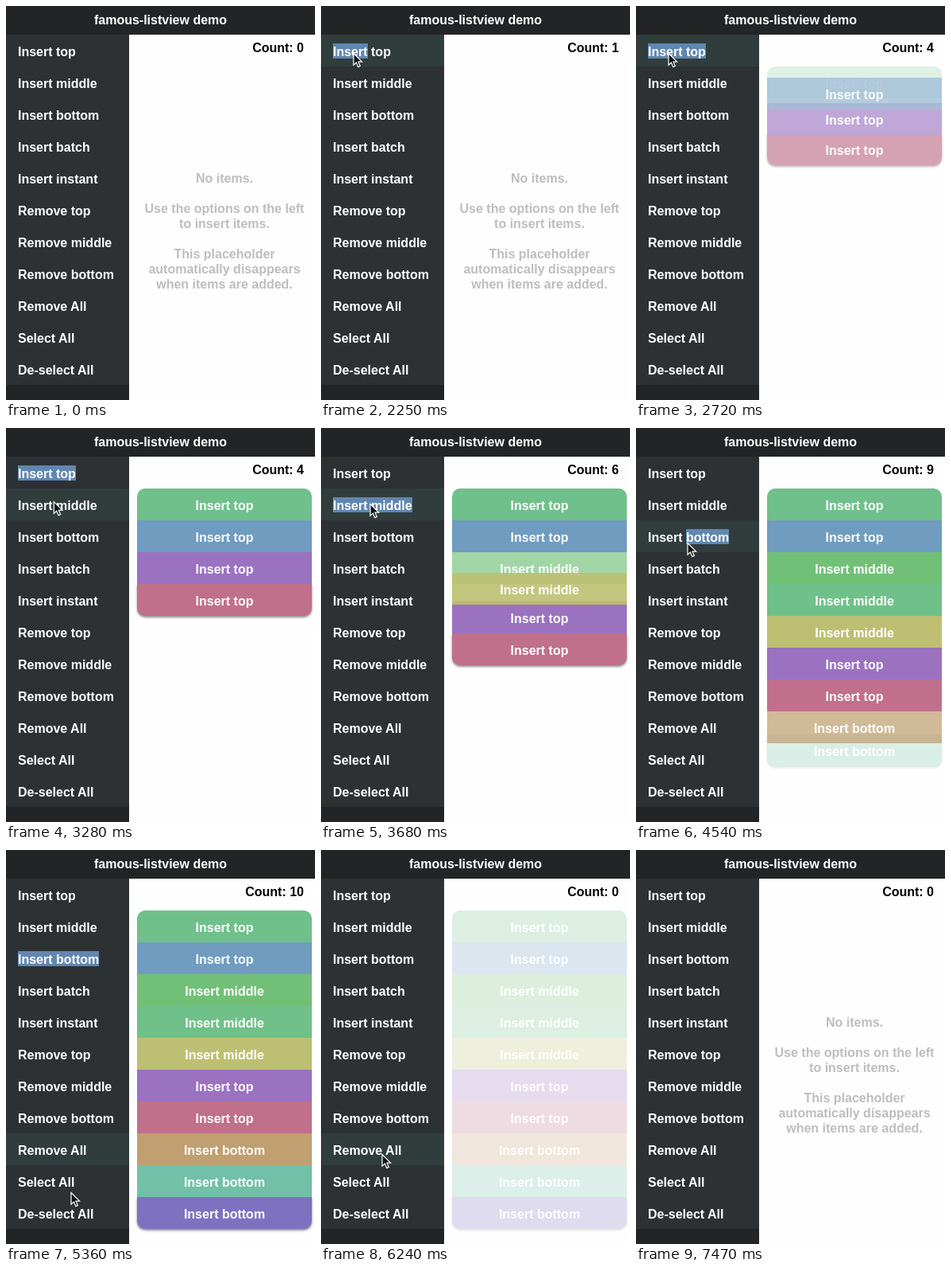
Recreate the animation shown at these times as an HTML page. Size 389 by 495 pixels, loop 8030 ms.

```html
<!DOCTYPE html>
<html lang="en">
<head>
<meta charset="utf-8">
<title>famous-listview demo</title>
<style>
  html, body { margin: 0; width: 100%; height: 100%; overflow: hidden; }
  body { position: relative; background: #fefefe; font: bold 16px/19px "Liberation Sans", Arial, sans-serif; }
  body > * { position: absolute; }
  header { left: 0; top: 0; width: 389px; height: 36px; line-height: 36px; text-align: center; background: #232426; color: #fff; }
  nav { left: 0; top: 36px; width: 155px; height: 459px; background: #232426; color: #fff; }
  nav div { height: 40px; line-height: 44px; padding-left: 15px; background: #2d3134; white-space: pre; }
  nav .hover { background: #303d3c; }
  mark { background: #6186b0; color: inherit; padding-top: 2px; }
  #count { right: 14px; top: 43px; color: #000; }
  #empty { left: 155px; top: 207px; width: 240px; text-align: center; white-space: pre; color: #bebebe; }
  #list { left: 165px; top: 76px; width: 220px; }
  #list div { position: absolute; width: 220px; height: 40px; line-height: 44px; text-align: center; color: #fff; }
  #list .first { border-top-left-radius: 10px; border-top-right-radius: 10px; }
  #list .last { border-bottom-left-radius: 10px; border-bottom-right-radius: 10px; box-shadow: 0 2px 3px rgba(0, 0, 0, .45); }
  #cursor { left: 0; top: 0; overflow: visible; z-index: 20; }
</style>
</head>
<body>
<header>famous-listview demo</header>
<nav></nav>
<div id="count"></div>
<div id="empty">No items.

Use the options on the left
to insert items.

This placeholder
automatically disappears
when items are added.</div>
<div id="list"></div>
<svg id="cursor" width="11" height="18">
  <path d="M0 .5V15.2L3.4 12.1 5.8 17.6 8.3 16.5 6 11.2H10.6Z" fill="#111" stroke="#fff" stroke-width="1.2"/>
</svg>
<script>
const LOOP = 8030, ROW = 40, CLEAR = 6060, ENTER = 720, LEAVE = 7470, HOVER_LAG = 100;
const $ = s => document.querySelector(s);
const clamp = v => Math.max(0, Math.min(1, v));
const ramp = (t, from, to) => clamp((t - from) / (to - from));

const labels = ['Insert top', 'Insert middle', 'Insert bottom', 'Insert batch', 'Insert instant',
  'Remove top', 'Remove middle', 'Remove bottom', 'Remove All', 'Select All', 'De-select All'];

// Items in list order: time added, menu label, colour
const items = [
  [2633, 0, '#70c08b'], [2506, 0, '#709cc0'], [3520, 1, '#72c078'], [3700, 1, '#70c08a'],
  [3397, 1, '#bdc072'], [2378, 0, '#9b72c0'], [2248, 0, '#c0708b'],
  [4359, 2, '#c0a070'], [4471, 2, '#72c0a8'], [4600, 2, '#7e72c0']
].map(([added, label, color]) => ({ added, label, color }));

// Selected text: from, to, row, first and last character
const selections = [
  [2248, 2380, 0, 0, 6], [2380, 3390, 0, 0, 10],
  [3480, 3600, 1, 7, 13], [3600, 4350, 1, 0, 13],
  [4460, 4590, 2, 7, 13], [4590, CLEAR, 2, 0, 13]
];

// Pointer path: time, x, y
const path = [
  [ENTER, 0, 50], [1000, 41, 59], [3060, 41, 59], [3300, 62, 95], [3920, 62, 95],
  [4250, 65, 144], [4900, 65, 144], [5360, 82, 430], [5440, 82, 430], [5530, 80, 422],
  [5700, 77, 382], [7310, 77, 382], [7415, 146, 470]
];

function add(parent, text) {
  const el = document.createElement('div');
  el.textContent = text;
  parent.append(el);
  return el;
}
const rows = labels.map(text => add($('nav'), text));
for (const item of items) {
  item.el = add($('#list'), labels[item.label]);
  item.el.style.background = item.color;
}

// Critically damped spring from 0 to 1
function spring(age) {
  const a = Math.max(0, age) * .0138;
  return 1 - (1 + a) * Math.exp(-a);
}

function pointer(t) {
  let i = 1;
  while (i < path.length - 1 && t > path[i][0]) i++;
  const [t0, x0, y0] = path[i - 1], [t1, x1, y1] = path[i];
  const k = ramp(t, t0, t1);
  return [x0 + (x1 - x0) * k, y0 + (y1 - y0) * k];
}

function drawMenu(t) {
  const visible = t >= ENTER && t < LEAVE;
  const [x, y] = pointer(t);
  $('#cursor').style.display = visible ? '' : 'none';
  $('#cursor').style.transform = `translate(${x}px, ${y}px)`;

  const hovered = visible ? Math.floor((pointer(t - HOVER_LAG)[1] - 36) / ROW) : -1;
  const sel = selections.find(([from, to]) => t >= from && t < to);
  rows.forEach((el, i) => {
    el.className = i === hovered ? 'hover' : '';
    const text = labels[i];
    const [a, b] = sel && sel[2] === i ? sel.slice(3) : [0, 0];
    const html = b ? `${text.slice(0, a)}<mark>${text.slice(a, b)}</mark>${text.slice(b)}` : text;
    if (el.innerHTML !== html) el.innerHTML = html;
  });
}

function drawList(t) {
  const shown = items.filter(item => t >= item.added);
  const newest = Math.max(...shown.map(item => item.added));
  let y = 0;
  items.forEach((item, i) => {
    const { el, added } = item, p = spring(t - added);
    el.style.display = t >= added ? '' : 'none';
    el.style.top = y + 'px';
    el.style.opacity = p;
    el.style.zIndex = added === newest ? 0 : items.length - i;
    el.className = (item === shown[0] ? 'first ' : '') + (item === shown.at(-1) ? 'last' : '');
    y += ROW * p;
  });
  $('#list').style.opacity = ramp(t, 2460, 2860) * (1 - ramp(t, CLEAR - 10, 6300));
  $('#empty').style.opacity = t < CLEAR ? 1 - ramp(t, 2250, 2450) : ramp(t, 6400, 6580);
  $('#count').textContent = 'Count: ' + (t < CLEAR ? shown.length : 0);
}

const start = performance.now();
function frame() {
  const t = (performance.now() - start) % LOOP;
  drawMenu(t);
  drawList(t);
  requestAnimationFrame(frame);
}
frame();
</script>
</body>
</html>
```
